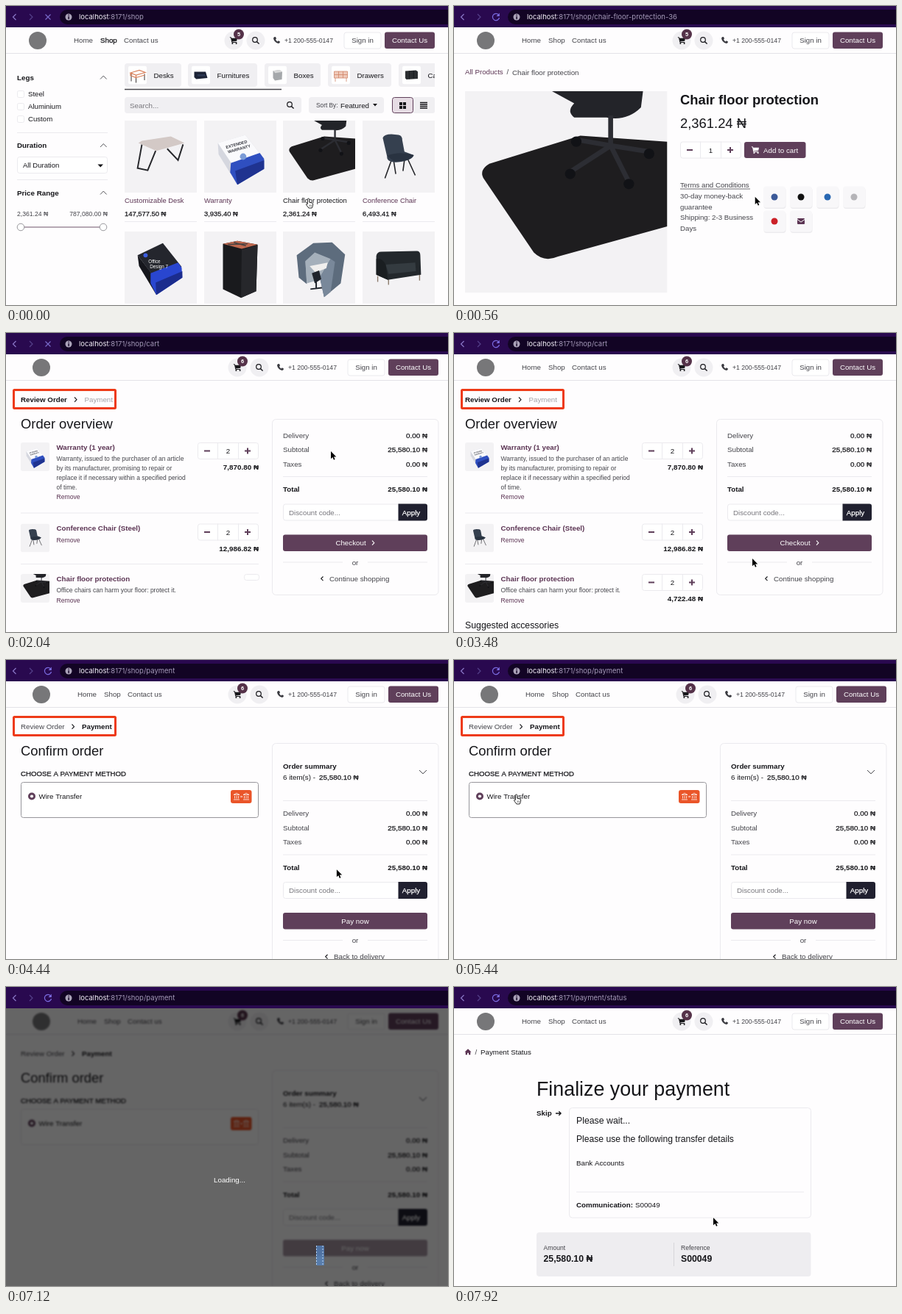
These frames come from a looping animation (600 px wide and 407 px high, 8000 ms). An HTML page with a canvas:

```html
<!DOCTYPE html>
<html lang="en">
<head>
<meta charset="utf-8">
<title>Shop checkout</title>
<style>
html, body { margin: 0; width: 100%; height: 100%; overflow: hidden; background: #fff; }
canvas { display: block; width: 600px; height: 407px; }
</style>
</head>
<body>
<canvas id="stage"></canvas>
<script>
const W = 600, H = 407, LOOP = 8000;
const SANS = '"Liberation Sans", Arial, sans-serif';
const INK = '#16161a', SOFT = '#44444a', PLUM = '#5f3f5a', LINK = '#5b3453', PALE = '#f0eff2', EDGE = '#ebeaee';
const canvas = document.getElementById('stage');
const ctx = canvas.getContext('2d');
const buffer = document.createElement('canvas');
const dpr = window.devicePixelRatio || 1;
for (const c of [canvas, buffer]) { c.width = W * dpr; c.height = H * dpr; }

// When each page or state begins
const AT = { product: 360, added: 1200, cart: 1760, mark: 1900, cartReady: 2240, pay: 4280, unmark: 6100, paid: 6700, wait: 6840, status: 7640 };
const BUSY = [[0, 320], [1640, 2200], [4120, 4400], [7520, 7720]];
const TRACK = [
  [0, 408, 262], [500, 408, 262], [1050, 429, 198], [1400, 429, 198], [1640, 441, 161], [2300, 441, 161],
  [3200, 405, 307], [3560, 405, 307], [3960, 452, 286], [4400, 452, 286], [5160, 82, 183], [5560, 82, 183],
  [6300, 424, 356], [7640, 424, 356], [7880, 352, 314], [LOOP, 352, 314]
];

// --- primitives ---
function txt(s, x, y, size = 9.7, color = INK, weight = '', align = 'left', family = SANS) {
  ctx.font = `${weight === 'bold' ? 'bold ' : ''}${size}px ${family}`;
  ctx.textAlign = align;
  ctx.fillStyle = color;
  const base = y + size * .36;
  ctx.fillText(s, x, base);
  if (weight === 'mid') {
    ctx.strokeStyle = color;
    ctx.lineWidth = .25;
    ctx.strokeText(s, x, base);
  }
}
function box(x, y, w, h, r, fill, stroke, lw = 1) {
  ctx.beginPath();
  ctx.roundRect(x, y, w, h, r);
  if (fill) { ctx.fillStyle = fill; ctx.fill(); }
  if (stroke) { ctx.strokeStyle = stroke; ctx.lineWidth = lw; ctx.stroke(); }
}
function dot(x, y, r, fill, stroke, lw = 1) {
  ctx.beginPath();
  ctx.arc(x, y, r, 0, 7);
  if (fill) { ctx.fillStyle = fill; ctx.fill(); }
  if (stroke) { ctx.strokeStyle = stroke; ctx.lineWidth = lw; ctx.stroke(); }
}
const fill = (d, color) => { ctx.fillStyle = color; ctx.fill(new Path2D(d)); };
function line(d, color, lw = 1) {
  ctx.strokeStyle = color;
  ctx.lineWidth = lw;
  ctx.stroke(new Path2D(d));
}
function at(x, y, scale, draw) {
  ctx.save();
  ctx.translate(x, y);
  ctx.scale(scale, scale);
  draw();
  ctx.restore();
}
const rule = (x1, x2, y) => line(`M${x1} ${y}H${x2}`, EDGE);
const button = (s, x, y, w, h, color = PLUM, c = '#fff') => {
  box(x, y, w, h, 3, color);
  txt(s, x + w / 2, y + h / 2, 9.75, c, '', 'center');
};
const cartIcon = (x, y, c) => at(x, y, 1, () => {
  fill('M-3.4 -3.3H5L4.2 .8 -2.4 1.5Z', c);
  line('M-5.2 -4.2H-3.5L-2.2 2.5H4.3', c, 1);
  dot(-1.6, 4, 1, c);
  dot(3.6, 4, 1, c);
});
const lens = (x, y) => { dot(x - 1, y - 1, 3.3, null, INK, 1.2); line(`M${x + 1.4} ${y + 1.4}l3.2 3.2`, INK, 1.4); };

// --- products, each on a 100 x 100 square ---
const art = {
  desk() {
    line('M24 33L18 66 32 69 43 42M59 39L74 55 81 33', '#25262a', 2);
    fill('M19 31L24 28 64 22 83 31 44 42Z', '#d3c9c6');
  },
  table() {
    line('M16 40V84M42 52V92M88 44V78', '#3a3436', 4);
    line('M12 38L60 24 92 36 42 50ZM42 64L90 50M12 38V52L42 64V50', '#d9805c', 5);
  },
  warranty() {
    fill('M19 31L57 20 83 53 83 67 46 89 20 47Z', '#d5d7df');
    fill('M19 31L57 20 83 53 43 67Z', '#fafafc');
    fill('M37 59L77 45 83 53 83 67 46 89 36 72Z', '#2f4fc0');
    fill('M43 70L83 55V67L46 89Z', '#1f3390');
    dot(54, 50, 4.5, '#7b9bd6');
    ctx.save();
    ctx.translate(30, 37);
    ctx.rotate(-.27);
    txt('EXTENDED', 0, 0, 5.6, '#33353d', 'bold');
    txt('WARRANTY', 1, 7, 5.6, '#33353d', 'bold');
    ctx.restore();
  },
  mat() {
    fill('M12 36L57 22 100 25V67L46 82Q39 85 34 80L9 43Q7 39 12 36Z', '#1e1d1f');
    fill('M43 0H88L87 8Q80 15 70 13L54 13Q50 10 54 6Z', '#232429');
    line('M72 12V27M72 27L55 24M72 27L52 40M72 27L81 45M72 27L91 30', '#2c2d33', 2.4);
    for (const [x, y] of [[55, 25], [52, 41], [81, 46], [91, 31]]) dot(x, y, 2.6, '#111216');
  },
  chair() {
    line('M40 55L31 80M62 52L73 76M43 55L46 74M58 55L56 70', '#222327', 1.6);
    fill('M28 24Q30 19 40 19L50 20Q55 21 55 27L58 43 71 48Q69 56 46 58 33 57 34 50Z', '#35404f');
    fill('M34 49Q50 42 71 48 66 57 44 57Z', '#293341');
  },
  design() {
    fill('M18 33L20 48 44 88 42 64Z', '#15161c');
    fill('M18 33L53 16 79 49 43 66Z', '#24262d');
    fill('M36 58L74 43 79 50 80 64 44 88 36 72Z', '#2946d0');
    fill('M43 71L80 55V64L44 88Z', '#1b2c8d');
    dot(29, 33, 3, '#3d5ee0');
    txt('Office', 33, 42, 6.4, '#fff');
    txt('Design 7', 35, 49, 6.4, '#fff');
  },
  cabinet() {
    fill('M26 17L46 13 74 18 72 83 51 92 26 80Z', '#191a1d');
    fill('M26 17L46 13 74 18 52 24Z', '#c0694f');
    fill('M52 25L74 19 72 83 51 92Z', '#26272b');
    line('M33 18L60 17M41 15L58 20', '#4b4442', 1.6);
  },
  booth() {
    fill('M31 41L44 25 68 24 78 36 53 66 33 72Z', '#a5b0bb');
    fill('M19 33L42 16 68 15 86 32 80 72 57 91 51 64 66 38 44 29 31 41 33 73 22 64Z', '#5d6c7d');
    fill('M57 91L51 64 66 38 72 42 66 84Z', '#79889a');
    fill('M37 48L62 43 60 51 45 57Z', '#f0efee');
    fill('M40 58L50 54 53 66 44 72Z', '#1f242c');
    line('M46 66V80M38 80L54 78', '#1f242c', 2);
  },
  sofa() {
    line('M21 62V70M36 66V74M79 59V68', '#8a7a6a', 1.4);
    fill('M19 34Q20 28 26 28L75 27Q80 27 80 33L81 60 35 67 19 60Z', '#23282c');
    fill('M32 46L73 43 74 55 36 59Z', '#343b40');
    fill('M19 38Q27 36 32 46L35 67 19 60Z', '#1a1e21');
  },
  furniture() { fill('M14 32H76L86 66 25 72 14 62Z', '#1c2336'); fill('M30 46H72L76 56H32Z', '#2c3852'); },
  crate() { fill('M26 27L62 22 76 33 74 74 36 80 26 66Z', '#a5a8ab'); fill('M26 27L62 22 76 33 38 39Z', '#d7d8d8'); },
  drawers() {
    fill('M14 30H86V66H14Z', '#efc9b9');
    line('M14 30H86V66H14ZM38 30V66M62 30V66M14 48H86M20 66V86M80 66V86', '#cf8265', 3);
  },
  cupboard() { fill('M16 28L74 24 84 31V70L22 74 16 67Z', '#2b2e31'); line('M38 28V72M61 26V70', '#15171a', 3); }
};
function photo(name, x, y, size, r = 0, bg = '#f3f2f4') {
  ctx.save();
  ctx.beginPath();
  ctx.roundRect(x, y, size, size, r);
  ctx.clip();
  ctx.fillStyle = bg;
  ctx.fillRect(x, y, size, size);
  at(x, y, size / 100, art[name]);
  ctx.restore();
}

// --- browser and site chrome ---
function browser(path, busy) {
  ctx.fillStyle = '#29094f';
  ctx.fillRect(0, 0, W, 29);
  box(73, 5, 540, 20, 10, '#120424');
  line('M13.5 11L9.5 15 13.5 19', '#8a77c6', 1.2);
  line('M32 11L36 15 32 19', '#54408a', 1.2);
  if (busy) line('M53.5 11.5L60.5 18.5M60.5 11.5L53.5 18.5', '#7868c8', 1.2);
  else {
    line('M60.5 12A4.6 4.6 0 1 0 61.5 16', '#7b6be0', 1.2);
    fill('M61.8 9.5V14H57.5Z', '#7b6be0');
  }
  dot(85, 15, 4.5, '#aaa2b8');
  fill('M84.4 14H85.8V18H84.4ZM84.4 11.8H85.8V13.1H84.4Z', '#120424');
  const f = 'Inter, Roboto, sans-serif';
  txt('localhost', 99, 15, 9.5, '#f6f3fb', '', 'left', f);
  const x = 99 + ctx.measureText('localhost').width;
  txt(':8171' + path, x, 15, 9.5, '#a49ab8', '', 'left', f);
}
function header(dx, count, active, nav = true) {
  at(dx, 0, 1, () => {
    dot(43, 47, 12, '#777779');
    if (nav) {
      txt('Home', 92, 46.5, 9.75, SOFT);
      txt('Shop', 128, 46.5, 9.75, active ? INK : SOFT, active ? 'mid' : '');
      txt('Contact us', 160, 46.5, 9.75, SOFT);
    }
    dot(309, 47, 12.5, PALE);
    dot(339, 47, 12.5, PALE);
    cartIcon(309, 47, INK);
    lens(339, 47);
    dot(316, 38.5, 7, '#553249');
    txt(count, 316, 38.5, 7.5, '#fff', 'bold', 'center');
    fill('M364 42.2L366 42 367 44.6 366 45.6Q366.8 47.5 368.6 48.4L369.6 47.3 372 48.6Q372 51 369.8 51 363.6 49.6 363 43.8Z', '#3a3a40');
    txt('+1 200-555-0147', 378, 47, 8.65, SOFT);
    box(459, 36, 50, 22, 3, '#fff', EDGE);
    txt('Sign in', 484, 46.5, 9.7, SOFT, '', 'center');
    button('Contact Us', 514, 35.5, 68, 22.5);
  });
  ctx.fillStyle = '#e4e3e8';
  ctx.fillRect(0, 64, W, 1);
}
function stepper(x, y, n) {
  box(x + .5, y + .5, 82, 22, 3, '#fff', EDGE);
  line(`M${x + 27.5} ${y}v23M${x + 55.5} ${y}v23`, EDGE);
  line(`M${x + 9} ${y + 11.5}h8M${x + 64} ${y + 11.5}h8M${x + 68} ${y + 7.5}v8`, PLUM, 2);
  txt(n, x + 41.5, y + 11.5, 9.75, INK, '', 'center');
}

// --- pages ---
function shop() {
  header(0, '5', true);
  [['Legs', 97], ['Duration', 189.5], ['Price Range', 254]].forEach(([s, y]) => {
    txt(s, 15, y, 9.8, INK, 'bold');
    line(`M128 ${y + 2.5}l4.3 -4.5 4.3 4.5`, SOFT, .9);
  });
  ['Steel', 'Aluminium', 'Custom'].forEach((s, i) => {
    box(15.5, 115.5 + i * 17, 9, 9, 2, '#fff', EDGE);
    txt(s, 30, 120 + i * 17, 9.65);
  });
  rule(15, 138, 172.5);
  rule(15, 138, 236.5);
  box(15.5, 205.5, 122, 22, 3, '#fff', EDGE);
  txt('All Duration', 23, 217, 9.55);
  fill('M124.5 215.5H132L128.2 219.5Z', INK);
  txt('2,361.24 ₦', 15, 283, 8.65, SOFT);
  txt('787,080.00 ₦', 138, 283, 8.65, SOFT, '', 'right');
  line('M20 301H132', '#6f526b', 1);
  dot(20, 301, 4.8, '#fff', '#8f8e94', .9);
  dot(132, 301, 4.8, '#fff', '#8f8e94', .9);

  ctx.save();
  ctx.beginPath();
  ctx.rect(161, 70, 421, 48);
  ctx.clip();
  [['Desks', 161, 77, 'table'], ['Furnitures', 247, 94, 'furniture'], ['Boxes', 351, 76, 'crate'],
    ['Drawers', 437, 86, 'drawers'], ['Cabinets', 533, 90, 'cupboard']].forEach(([s, x, w, pic]) => {
    box(x, 78, w, 32, 4, PALE);
    photo(pic, x + 5, 81.5, 25, 3, '#fff');
    txt(s, x + 39.5, 94, 9.75);
  });
  ctx.restore();
  line('M161 113.5H374', '#46454b', 1.4);
  box(161, 124, 240, 22, 4, PALE);
  txt('Search...', 168, 135, 9.8, '#77767c');
  lens(386, 135);
  box(411, 124, 102, 22, 4, PALE);
  txt('Sort By:', 421, 135, 8.3, SOFT);
  txt('Featured', 454, 135, 9.75);
  fill('M498 133H504L501 136.5Z', INK);
  box(552, 124, 30, 22, 3, PALE);
  box(524.5, 124.5, 28, 21, 3, '#e6dce4', PLUM);
  for (const x of [534, 539]) for (const y of [131, 136]) box(x, y, 4, 4, 0, INK);
  line('M562 131.5h10M562 134h10M562 136.5h10M562 139h10', INK, 1.4);

  const xs = [161, 269, 376, 484];
  [['desk', 'Customizable Desk', '147,577.50 ₦'], ['warranty', 'Warranty', '3,935.40 ₦'],
    ['mat', 'Chair floor protection', '2,361.24 ₦'], ['chair', 'Conference Chair', '6,493.41 ₦']].forEach(([pic, s, p], i) => {
    photo(pic, xs[i], 156, 98);
    txt(s, xs[i], 264.5, 9.35, i === 2 ? INK : LINK);
    txt(p, xs[i], 282.5, 9.4, INK, 'mid');
    rule(xs[i], xs[i] + 98, 293.5);
  });
  ['design', 'cabinet', 'booth', 'sofa'].forEach((pic, i) => photo(pic, xs[i], 307, 98));
}

function product(t) {
  const added = t >= AT.added;
  header(0, added ? '6' : '5', false);
  txt('All Products', 15, 90, 9.7, LINK);
  txt('/', 71.5, 90, 9.7, SOFT);
  txt('Chair floor protection', 79, 90, 9.75, SOFT);
  photo('mat', 15, 116, 274.5);
  txt('Chair floor protection', 307, 127, 18.4, INK, 'bold');
  txt('2,361.24 ₦', 307, 159, 18.4);
  stepper(307, 184.5, '1');
  button('', 394, 185, 83.5, 22, t > 1000 ? '#543350' : PLUM);
  cartIcon(409, 196, '#fff');
  txt('Add to cart', 420, 196, 9.75, '#fff');
  txt('Terms and Conditions', 307, 243.5, 9.7, SOFT);
  line('M307 249H402', SOFT, .8);
  ['30-day money-back', 'guarantee', 'Shipping: 2-3 Business', 'Days'].forEach((s, i) => txt(s, 307, 258.5 + i * 14.6, 9.7, SOFT));
  ['#3b5998', '#111', '#2867b2', '#b5b4b8', '#cb2027', null].forEach((c, i) => {
    const x = 435 + i % 4 * 36, y = i < 4 ? 260 : 293;
    box(x - 14.5, y - 13, 30, 29, 4, '#ecebee');
    box(x - 15, y - 14.5, 30, 29, 4, '#f8f7f9');
    if (c) dot(x, y, 4.5, c);
    else {
      box(x - 5, y - 4, 10, 8, 1, LINK);
      line(`M${x - 5} ${y - 2.5}l5 3.6 5 -3.6`, '#fff', 1);
    }
  });
  if (!added) return;
  ctx.save();
  ctx.shadowColor = 'rgba(0,0,0,.25)';
  ctx.shadowBlur = 6 * dpr;
  ctx.shadowOffsetY = 2 * dpr;
  box(369, 70, 212.5, 108, 4, '#fff');
  ctx.restore();
  box(369, 70, 212.5, 108, 4, null, '#dddce2', .8);
  txt('Item(s) added to your cart', 376, 80.5, 8.55, SOFT, 'bold');
  line('M568 77l8 8M576 77l-8 8', '#55555a', 1.1);
  rule(369, 581, 91.5);
  photo('mat', 376, 99, 39, 3);
  txt('2 x Chair floor protection', 427, 105.5, 8.55);
  txt('4,722.48 ₦', 574.5, 105.5, 8.55, INK, '', 'right');
  button('View cart', 376, 148.5, 198, 22.5);
}

function totals(y) {
  ['Delivery', 'Subtotal', 'Taxes'].forEach((s, i) => {
    txt(s, 371, y + i * 19.5, 9.75, SOFT);
    txt(i === 1 ? '25,580.10 ₦' : '0.00 ₦', 567, y + i * 19.5, 9.85, INK, 'mid', 'right');
  });
  rule(371, 567, y + 56.5);
  txt('Total', 371, y + 73.5, 9.75, INK, 'bold');
  txt('25,580.10 ₦', 567, y + 73.5, 9.85, INK, 'bold', 'right');
  box(371.5, y + 94, 160, 22, 3, '#fff', EDGE);
  txt('Discount code...', 379, y + 105, 9.75, '#77767c');
  box(527.5, y + 93.5, 39.5, 23, [0, 3, 3, 0], '#20202f');
  txt('Apply', 545, y + 105, 9.75, '#fff', 'mid', 'center');
}
function orLine(y, s) {
  rule(371, 452, y);
  rule(486, 567, y);
  txt('or', 469, y, 9.75, SOFT, '', 'center');
  const x = s.startsWith('C') ? 434 : 440;
  line(`M${x - 8.5} ${y + 19.5}l-2.8 2.8 2.8 2.8`, INK, 1.1);
  txt(s, x, y + 22, 9.75, SOFT);
}
function steps(paying) {
  const [gap, next] = paying ? [86, 98] : [89.5, 101.5];
  txt('Review Order', 15, 90.5, 9.75, paying ? SOFT : INK, paying ? '' : 'bold');
  line(`M${gap - 1.5} 87.5l3 3.2 -3 3.2`, INK, 1.1);
  txt('Payment', next, 90.5, 9.75, paying ? INK : '#a2a1a7', paying ? 'bold' : '');
}

function cart(t) {
  const ready = t >= AT.cartReady, dx = ready ? 0 : 5;
  header(dx, '6', false, ready);
  at(dx, 0, 1, () => {
    steps(false);
    txt('Order overview', 15, 123.5, 18.4);
    [['warranty', 'Warranty (1 year)', 155, '7,870.80 ₦', 223], ['chair', 'Conference Chair (Steel)', 265.5, '12,986.82 ₦', 282],
      ['mat', 'Chair floor protection', 334, '4,722.48 ₦', 364]].forEach(([pic, s, y, p, ry], i) => {
      photo(pic, 15, y - 6, 39, 3);
      txt(s, 63.5, y, 9.75, LINK, 'bold');
      txt('Remove', 63.5, ry, 8.6, LINK);
      if (i === 2 && !ready) { box(318.5, y - 5.5, 20, 8, 3, '#fff', EDGE); return; }
      stepper(255, y - 6, '2');
      txt(p, 338, y + 27.5, 9.85, INK, 'bold', 'right');
    });
    ['Warranty, issued to the purchaser of an article', 'by its manufacturer, promising to repair or',
      'replace it if necessary within a specified period', 'of time.'].forEach((s, i) => txt(s, 63.5, 170.5 + i * 13, 8.5, SOFT));
    txt('Office chairs can harm your floor: protect it.', 63.5, 350, 8.5, SOFT);
    rule(15, 338, 245);
    rule(15, 338, 314.5);
    if (ready) txt('Suggested accessories', 15, 397.5, 12.3);
    box(356.5, 117.5, 225.5, 239, 5, '#fefdfe', EDGE);
    totals(139);
    button('', 371, 274.5, 196, 22.5);
    txt('Checkout', 463, 285.7, 9.75, '#fff', '', 'center');
    line('M492 282.7l2.8 3 -2.8 3', '#fff', 1.1);
    orLine(312, 'Continue shopping');
  });
}

function payment(t) {
  const paid = t >= AT.paid;
  header(5, '6', false, t > AT.pay + 160);
  at(5, 0, 1, () => {
    steps(true);
    txt('Confirm order', 15, 123.5, 18.4);
    txt('CHOOSE A PAYMENT METHOD', 15, 155, 9.65, INK, 'mid');
    box(15.5, 166.5, 322, 48, 3, '#fff', paid ? EDGE : '#97969b');
    dot(30, 185.5, 5, PLUM);
    dot(30, 185.5, 2.1, '#fff');
    txt('Wire Transfer', 39.5, 185, 9.75);
    box(300, 177, 28.5, 18, 3, '#ea5529');
    for (const x of [304, 317]) line(`M${x} 183.5l4 -2.2 4 2.2ZM${x + 1.5} 185v3.5M${x + 4} 185v3.5M${x + 6.5} 185v3.5M${x} 190h8`, '#fff', .8);
    line('M312.5 186h3.2M314.5 184.8l1.2 1.2 -1.2 1.2', '#fff', .7);
    box(356.5, 113.5, 225.5, 320, 5, '#fefdfe', EDGE);
    txt('Order summary', 371, 144.5, 9.75, INK, 'bold');
    txt('6 item(s) -', 371, 159.5, 9.75);
    txt('25,580.10 ₦', 420, 159.5, 9.85, INK, 'mid');
    line('M556 150l5 4.8 5 -4.8', SOFT, 1);
    rule(371, 567, 191.5);
    totals(208.5);
    button('Pay now', 371, 344, 196, 22.5, paid ? '#a594a1' : PLUM);
    orLine(381.5, 'Back to delivery');
  });
}

function loading() {
  const b = buffer.getContext('2d');
  b.drawImage(canvas, 0, 0);
  ctx.save();
  ctx.beginPath();
  ctx.rect(0, 29, W, H);
  ctx.clip();
  ctx.filter = `blur(${.9 * dpr}px)`;
  ctx.drawImage(buffer, 0, 0, W, H);
  ctx.filter = 'none';
  ctx.fillStyle = 'rgba(0,0,0,.6)';
  ctx.fillRect(0, 29, W, H);
  ctx.restore();
  txt('Loading...', 303.5, 262, 9.75, '#fff', '', 'center');
}

function status() {
  header(0, '6', false);
  fill('M14.5 88.5L19 84.2 23.5 88.5H22.3V92.3H20V89.7H18V92.3H15.7V88.5Z', LINK);
  txt('/', 28.5, 88, 9.75, SOFT);
  txt('Payment Status', 36, 88, 9.75);
  txt('Finalize your payment', 112, 138.5, 26.8);
  txt('Skip', 112, 171.5, 9.8, INK, 'bold');
  line('M138 172h7M142.3 169.2l2.8 2.8 -2.8 2.8', INK, 1.3);
  box(156.5, 164.5, 328, 149.5, 4, '#fefdfe', EDGE);
  txt('Please wait...', 166, 182, 12.3);
  txt('Please use the following transfer details', 166, 206.5, 12.15);
  txt('Bank Accounts', 166, 239, 9.75);
  rule(166, 475, 279);
  txt('Communication:', 166, 296.5, 9.75, INK, 'bold');
  txt('S00049', 246, 296.5, 9.75);
  box(112, 334, 372.5, 60, 4, '#eeedf0');
  line('M298.5 348V380', '#d6d5da');
  txt('Amount', 121.5, 354.5, 8.6, SOFT);
  txt('Reference', 308, 354.5, 8.6, SOFT);
  txt('25,580.10 ₦', 121.5, 370, 12.25, INK, 'bold');
  txt('S00049', 308, 370, 12.25, INK, 'bold');
}

// --- pointer ---
function pointer(t) {
  const i = TRACK.findIndex(k => k[0] > t);
  const [t0, x0, y0] = TRACK[i - 1], [t1, x1, y1] = TRACK[i];
  const p = (t - t0) / (t1 - t0), e = p * p * (3 - 2 * p);
  return [x0 + (x1 - x0) * e, y0 + (y1 - y0) * e];
}
function overLink(t, x, y) {
  const inside = (l, top, r, b) => x >= l && x <= r && y >= top && y <= b;
  if (t < AT.product) return true;
  if (t < AT.cart) return inside(394, 185, 477, 207) || (t >= AT.added && inside(376, 148, 574, 171));
  if (t < AT.pay) return inside(371, 274, 567, 297);
  return t < AT.status && (inside(20, 166, 343, 214) || inside(376, 344, 572, 367));
}
function drawPointer(t) {
  const [x, y] = pointer(t);
  if (t >= AT.wait && t < AT.status) {
    box(421, 352, 11, 27, 1, 'rgba(84,134,196,.75)');
    ctx.setLineDash([2, 2]);
    line('M421.5 352V379M430 352V379', '#b9d6f5', 1);
    ctx.setLineDash([]);
    return;
  }
  ctx.lineJoin = 'round';
  at(x, y, 1, () => {
    if (overLink(t, x, y)) {
      const hand = 'M2.5 0C3.4 0 3.8 .6 3.8 1.4V5.2L7.6 6.1Q8.9 6.5 8.7 8L8.1 11 7.2 13H2.9L-.2 8.8C-.9 7.7 0 6.8 1 7.6L1.3 7.9V1.4C1.3 .6 1.7 0 2.5 0Z';
      fill(hand, '#fff');
      line(hand, '#111', .9);
      line('M4.2 8.5V11M6.2 8.5V11', '#111', .6);
    } else {
      const arrow = 'M0 0V10.2L2.4 8 4 11.8 5.6 11.1 4 7.4H7.3Z';
      line(arrow, '#fff', 1.6);
      fill(arrow, '#000');
    }
  });
  ctx.lineJoin = 'miter';
}

function draw(t) {
  ctx.setTransform(dpr, 0, 0, dpr, 0, 0);
  ctx.fillStyle = '#fefdfe';
  ctx.fillRect(0, 0, W, H);
  const [page, path] = t < AT.product ? [shop, '/shop']
    : t < AT.cart ? [product, '/shop/chair-floor-protection-36']
    : t < AT.pay ? [cart, '/shop/cart']
    : t < AT.status ? [payment, '/shop/payment']
    : [status, '/payment/status'];
  page(t);
  if (t >= AT.mark && t < AT.unmark) box(10.5, 77.5, 138, 25, 1, null, '#ee3a17', 3);
  if (t >= AT.wait && t < AT.status) loading();
  browser(path, BUSY.some(([a, b]) => t >= a && t < b));
  drawPointer(t);
}

const start = performance.now();
function tick() {
  draw((performance.now() - start) % LOOP);
  requestAnimationFrame(tick);
}
tick();
</script>
</body>
</html>
```
